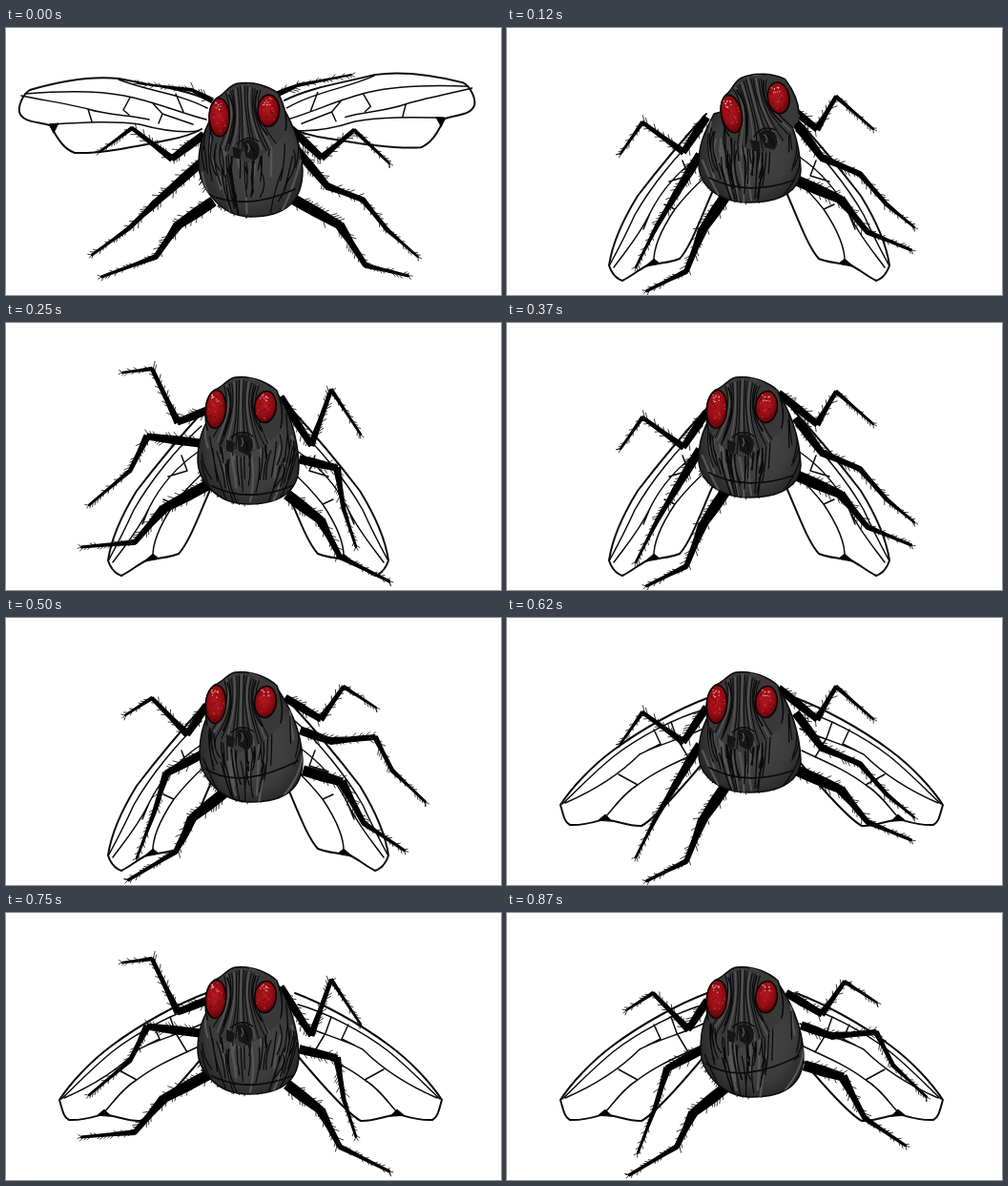
Recreate the animation shown at these times as an HTML page. Size 519 px wide and 280 px high, loop 1000 ms.

```html
<!DOCTYPE html>
<html lang="en">
<head>
<meta charset="utf-8">
<title>Fly</title>
<style>
html, body { margin: 0; width: 100%; height: 100%; overflow: hidden; background: #fff; }
svg { display: block; width: 100vw; height: 100vh; }
path { stroke-linecap: round; stroke-linejoin: round; }
.line { fill: none; stroke: #0b0b0b; }
</style>
</head>
<body>
<svg id="stage" viewBox="0 0 519 280">
  <defs>
    <radialGradient id="shell" cx=".52" cy=".5" r=".58">
      <stop offset="0" stop-color="#474747"/>
      <stop offset=".65" stop-color="#3c3c3c"/>
      <stop offset="1" stop-color="#222"/>
    </radialGradient>
    <radialGradient id="ruby" cx=".45" cy=".42" r=".62">
      <stop offset="0" stop-color="#b01820"/>
      <stop offset=".6" stop-color="#930d13"/>
      <stop offset="1" stop-color="#4d0508"/>
    </radialGradient>
    <clipPath id="faceClip"><path id="faceShape"/></clipPath>
  </defs>
</svg>
<script>
const stage = document.getElementById('stage');

let seed = 1;
function rnd(a = 0, b = 1) {
  seed = (seed * 16807) % 2147483647;
  return a + (b - a) * seed / 2147483647;
}
const n1 = v => Math.round(v * 10) / 10;
const line = (d, w, extra = '') => `<path class="line" d="${d}" stroke-width="${w}" ${extra}/>`;

// Wings: left half as drawn, right half mirrored around `sum / 2`.
const WINGS = {
  open: {
    sum: 505, turn: 'rotate(-2.3 290 75)',
    edge: 'M213 76C185 63 150 60 118 53C88 50 52 57 25 65C17 70 13 82 14 88C17 99 32 98 46 102C52 111 58 126 72 131C100 132 138 124 172 117C188 114 198 110 205 106',
    veins: 'M20 69C58 66 94 65 124 71C152 76 180 88 210 96M118 54C148 66 180 68 211 84M46 101C80 99 112 97 140 101Q176 111 202 108M16 71C40 76 68 80 86 85C108 92 132 91 150 96M86 85L90 98M130 73L123 86L129 91M153 78L164 90L160 100M164 90L196 101M178 69L186 88',
    notch: 'M46 101L55 100L50 110Z'
  },
  folded: {
    sum: 508, turn: '',
    edge: 'M209 90C188 113 160 146 137 176C121 202 110 228 107 249C110 258 115 263 121 265C131 260 140 252 149 248C160 247 172 246 181 242C193 229 204 197 217 168',
    veins: 'M205 108C180 130 151 166 134 196C124 218 115 235 108 248M203 134C178 151 162 170 150 194C138 219 122 237 112 251M154 246C153 228 164 208 176 190Q191 171 209 155M184 139L190 155L170 161M150 194L143 211M176 190L165 185',
    notch: 'M145 250L154 242L160 247Z'
  },
  half: {
    sum: 513, turn: '',
    edge: 'M210 84C183 94 143 115 111 139C88 156 67 179 56 196C59 206 60 214 66 217C80 218 91 214 102 211C116 213 130 219 141 218C154 211 181 181 207 150',
    veins: 'M207 96C178 104 139 124 112 145C91 162 74 180 58 195M206 116C185 126 158 133 139 143C119 163 91 181 61 194M102 210C113 198 122 184 137 175C158 159 181 150 204 139M154 117L161 132L147 139M172 109L178 126M137 175L117 164M178 126L190 146',
    notch: 'M96 212L103 206L110 213Z'
  }
};

function wings(name) {
  const w = WINGS[name];
  const half = line(w.edge, 2) + line(w.veins, 1.5) +
    `<path d="${w.notch}" stroke="#000" stroke-width="1"/>`;
  return `<g>${half}</g><g transform="${w.turn} matrix(-1 0 0 1 ${w.sum} 0)">${half}</g>`;
}

// Legs: joint coordinates from body to claw, in order LF LM LH RF RM RH.
const POSES = {
  rest: {
    legs: [
      [207,112, 174,137, 132,105, 98,130], [207,139, 157,183, 129,210, 90,238],
      [217,182, 180,207, 157,240, 100,261], [299,106, 331,136, 365,107, 402,142],
      [305,128, 337,166, 374,180, 400,212, 432,240], [302,180, 350,207, 377,249, 422,260]],
    box: [202, 311, 198], crease: 'M213 175Q253 192 303 169',
    head: 'translate(3.5 1) rotate(-5 246 89)'
  },
  walk: {
    legs: [
      [209,94, 185,130, 142,99, 119,132], [202,133, 179,171, 157,208, 135,251],
      [228,178, 205,212, 188,255, 146,276], [285,74, 325,106, 345,72, 384,106],
      [303,100, 330,136, 370,153, 398,185, 427,209], [304,160, 350,180, 378,214, 424,233]],
    box: [201, 308, 183], crease: 'M212 157Q250 177 300 160', head: ''
  },
  reach: {
    legs: [
      [210,92, 180,104, 153,48, 122,52], [203,126, 148,119, 130,155, 87,191],
      [215,168, 165,195, 135,230, 79,235], [288,78, 320,128, 341,70, 372,117],
      [308,143, 347,152, 354,195, 367,235], [295,180, 330,207, 350,245, 402,271]],
    box: [201, 307, 190], crease: 'M216 171Q254 190 302 170', head: ''
  },
  step: {
    legs: [
      [210,92, 190,122, 153,84, 125,102], [207,142, 168,163, 155,205, 137,252],
      [228,184, 195,210, 178,245, 128,275], [293,84, 330,106, 354,72, 388,94],
      [309,118, 340,129, 387,125, 405,160, 440,193], [312,160, 352,172, 375,215, 418,244]],
    box: [203, 311, 193], crease: 'M209 158Q244 181 306 150', head: ''
  }
};
POSES.tilt = { ...POSES.walk, head: 'translate(14 -7.5) rotate(-16 246 89)' };

// Tapered limb with bristles leaning towards its tip.
function limb(p, k, widths) {
  const last = p.length / 2 - 1;
  const w = widths || (last === 4 ? [9, 8, 5.5, 4, 1.6] : [9, 8, 4, 1.6]);
  let solid = '', hairs = '';
  for (let i = 0; i < last; i++) {
    const [x, y, u, v] = p.slice(i * 2, i * 2 + 4);
    const len = Math.hypot(u - x, v - y), cx = (u - x) / len, cy = (v - y) / len;
    const a = w[i] * k / 2, b = w[i + 1] * k / 2 * (i ? 1 : .85), m = (a + b) / 2 * (i ? .8 : 1.15);
    const at = (t, s) => `${n1(x + cx * len * t - cy * s)} ${n1(y + cy * len * t + cx * s)}`;
    solid += `M${at(0, a)}L${at(.45, m)}L${at(1, b)}L${at(1, -b)}L${at(.45, -m)}L${at(0, -a)}Z`;
    for (let d = 4; d < len; d += 3.6) {
      const side = rnd() < .5 ? -1 : 1, long = rnd(3, i === last - 1 ? 5 : 8);
      const t = d / len, tip = t + long * .8 / len;
      hairs += `M${at(t, side * m * .6)}L${at(tip, side * (m + long * .55))}`;
    }
    if (i === last - 1) hairs += `M${at(1, 0)}L${at(1 + 3 / len, 3)}M${at(1, 0)}L${at(1 + 4 / len, -1)}`;
  }
  return `<path d="${solid}" stroke="#000" stroke-width="1.4"/>` + line(hairs, .8);
}

const FACE = 'M209 92C208 77 218 69 227 66C233 58 240 56 247 57C261 58 277 64 284 72C289 85 291 100 288 113L270 130L246 141L226 130L211 112Z';
document.getElementById('faceShape').setAttribute('d', FACE);

function eye(x, y, rx, ry, turn) {
  let dots = '';
  for (let i = 0; i < 26; i++) {
    const a = rnd(0, 6.28), r = Math.sqrt(rnd()) * .85;
    const lit = i < 11;
    const ex = lit ? rnd(-.55, .25) * rx : Math.cos(a) * r * rx;
    const ey = lit ? rnd(-.8, -.35) * ry : Math.sin(a) * r * ry;
    dots += `<circle cx="${n1(ex)}" cy="${n1(ey)}" r="${lit ? .65 : .8}" fill="${lit ? '#efb9b4' : i % 2 ? '#c9313a' : '#65070b'}"/>`;
  }
  return `<g transform="translate(${x} ${y}) rotate(${turn})">
    <ellipse rx="${rx}" ry="${ry}" fill="url(#ruby)" stroke="#130304" stroke-width="1.6"/>${dots}</g>`;
}

function head(turn) {
  let dark = '', pale = '';
  for (let i = -7; i <= 7; i++) {
    const j = rnd(-2, 2);
    const d = `M${n1(247 + i * 2.6)} ${n1(59 + Math.abs(i))}C${n1(246 + i * 1.6 + j)} 84 ${n1(246 + i * 2.2 - j)} 100 ${n1(246 + i * 5)} ${n1(rnd(122, 140))}`;
    if (i % 3) dark += d; else pale += d;
  }
  return `<g transform="${turn}"><path d="${FACE}" fill="#393939"/>
    <g clip-path="url(#faceClip)">${line(pale, 1.5, 'style="stroke:#565656"')}${line(dark, 1.1)}
    ${line('M232 68C238 83 236 101 228 118M262 66C256 82 258 98 268 113', 1.8)}</g>
    ${line('M211 112C207 96 209 76 219 70C228 67 231 59 240 57C257 55 274 62 284 71C289 84 291 98 288 110', 1.6)}
    <path d="M231 122L240 126L238 136L231 134ZM242 118Q251 113 258 122Q261 132 253 139L244 134Z" fill="#161616"/>
    ${line('M236 120Q248 110 259 119M245 122Q254 122 253 134', 1.4)}
    ${line('M247 121Q250 125 247 129', 1.6, 'style="stroke:#505050"')}
    ${eye(220, 90.5, 10.6, 20, 4)}${eye(272, 88, 11.3, 16.6, 7)}</g>`;
}

function torso(pose, id) {
  const [l, r, b] = pose.box, c = (l + r) / 2, h = (r - l) / 2;
  const shape = `M217 90C208 108 ${l} 120 ${l} 143C${l} 164 ${c - 34} ${b} ${c} ${b}C${c + 38} ${b} ${r} ${b - 17} ${r} 149C${r - 1} 118 296 90 283 72Z`;
  let dark = '', pale = '', fringe = '';
  for (let i = 0; i < 52; i++) {
    const u = rnd(-1, 1), y = rnd(92, b - 40), e = y + rnd(22, 62);
    const bend = t => c + u * h * (.62 + .4 * Math.sin((t - 70) / (b - 70) * 3));
    const m = (y + e) / 2;
    const d = `M${n1(bend(y))} ${n1(y)}Q${n1(bend(m) + rnd(-6, 6))} ${n1(m)} ${n1(bend(e) - u * 5)} ${n1(e)}`;
    if (i % 4) dark += d; else pale += d;
  }
  for (let i = 0; i < 44; i++) {
    const a = rnd(.15, Math.PI - .15), x = c + Math.cos(a) * h * .92, y = 146 + Math.sin(a) * (b - 148);
    fringe += `M${n1(x)} ${n1(y - 5)}l${n1(Math.cos(a) * 5 + rnd(-2, 2))} ${n1(rnd(5, 9))}`;
  }
  return `<clipPath id="${id}"><path d="${shape}"/></clipPath>
    ${line(fringe, .9)}<path d="${shape}" fill="url(#shell)" stroke="#0b0b0b" stroke-width="1.5"/>
    <g clip-path="url(#${id})">${line(pale, 2.2, 'style="stroke:#565656"')}${line(dark, 1.3)}${line(pose.crease, 1.8)}</g>`;
}

function fly(poseName, wingName, id) {
  const pose = POSES[poseName];
  seed = 4711;
  let s = wings(wingName);
  if (wingName === 'open') {
    s += limb([216,76, 195,65, 138,58], .8, [6, 3, 1]) + limb([285,69, 306,60, 362,49], .8, [6, 3, 1]);
  }
  pose.legs.forEach((p, i) => { s += limb(p, [.78, .85, 1.1][i % 3]); });
  return s + torso(pose, id) + head(pose.head);
}

// Start time in ms, leg pose, wing position.
const BEATS = [
  [0, 'rest', 'open'], [120, 'tilt', 'folded'], [250, 'reach', 'folded'], [370, 'walk', 'folded'],
  [500, 'step', 'folded'], [620, 'walk', 'half'], [750, 'reach', 'half'], [870, 'step', 'half']
];
const LOOP = 1000;

const views = BEATS.map(([, pose, wing], i) => {
  const g = document.createElementNS('http://www.w3.org/2000/svg', 'g');
  g.innerHTML = fly(pose, wing, 'torso' + i);
  stage.appendChild(g);
  return g;
});

function draw(ms) {
  const t = ms % LOOP;
  const now = BEATS.filter(b => b[0] <= t).length - 1;
  views.forEach((g, i) => { g.style.display = i === now ? '' : 'none'; });
}

draw(0);
const start = performance.now();
function tick() {
  draw(Math.max(0, performance.now() - start));
  requestAnimationFrame(tick);
}
requestAnimationFrame(tick);
</script>
</body>
</html>
```
